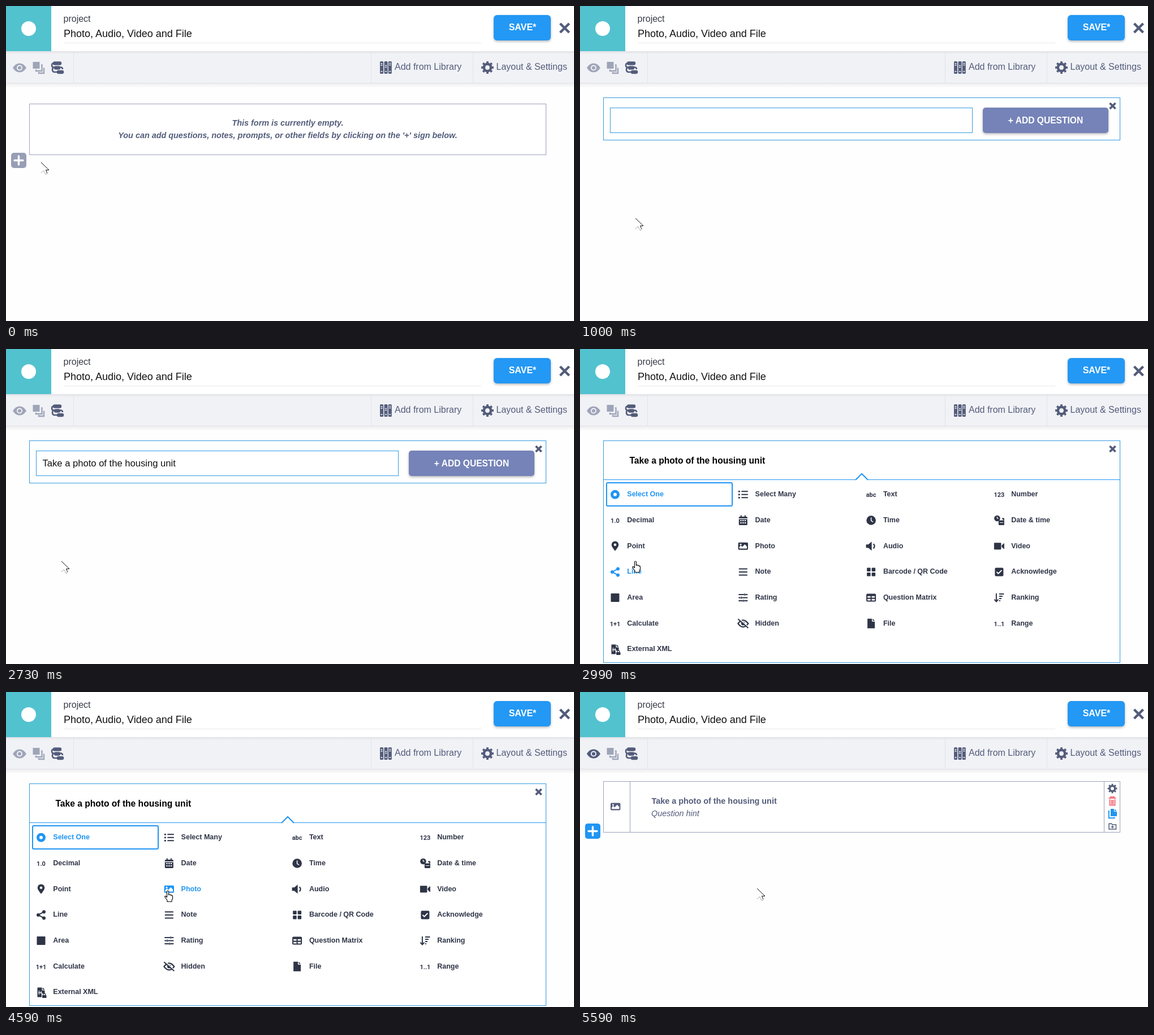
Recreate the animation shown at these times as an HTML page. Size 1004 by 558 pixels, loop 6.47 s.

```html
<!DOCTYPE html>
<html lang="en">
<head>
<meta charset="utf-8">
<title>Form builder</title>
<style>
  html, body { margin: 0; width: 100%; height: 100%; overflow: hidden; background: #fefefe; }
  svg { display: block; width: 100%; height: 100%; }
  text { font-family: "Liberation Sans", Arial, sans-serif; fill: currentColor; white-space: pre; }
  .b { font-weight: 700; }
  .i { font-style: italic; }
  .mid { text-anchor: middle; }
  .s16 { font-size: 16px; }
  .s14 { font-size: 14.4px; }
  .num { font: 700 11px Roboto, sans-serif; text-anchor: middle; }
  .label { font-size: 12.5px; font-weight: 700; }
  .ln { fill: none; stroke: currentColor; }
  .lift { filter: drop-shadow(0 2px 2px rgba(0,0,0,.28)); }
  .slate { color: #535c7a; }
  .blue { color: #2095f3; }
</style>
</head>
<body>
<svg viewBox="0 0 1004 558" fill="currentColor">
  <defs>
    <linearGradient id="fade" x2="0" y2="1">
      <stop stop-color="#000" stop-opacity=".07"/><stop offset="1" stop-color="#000" stop-opacity="0"/>
    </linearGradient>
    <g id="gear" class="ln">
      <circle r="6.2" stroke-width="4.6"/>
      <circle r="9" stroke-width="4" pathLength="16" stroke-dasharray="1" transform="rotate(-11.25)"/>
    </g>
    <g id="eye">
      <path d="M-12 0Q-7-8 0-8T12 0Q7 8 0 8T-12 0Z"/>
      <circle r="5" fill="#f1f2f6"/><circle r="3.1"/>
    </g>
    <g id="picture">
      <rect x="-8.7" y="-6.5" width="17.4" height="13" rx="2"/>
      <path fill="#fff" d="M-6.7 4.3V1.6L-4-1.2-1.5 1.3 3-3.3 6.7.5V4.3Z"/>
      <circle cx="-4.3" cy="-3" r="1.5" fill="#fff"/>
    </g>
    <g id="plus">
      <rect width="27" height="27" rx="5"/>
      <path d="M13.5 6V21M6 13.5H21" stroke="#fff" stroke-width="3.4" stroke-linecap="round"/>
    </g>
    <path id="cross" class="ln" d="M-1-1 1 1M1-1-1 1"/>
  </defs>

  <rect width="1004" height="558" fill="#fefefe"/>
  <rect y="136" width="1004" height="9" fill="url(#fade)"/>
  <rect y="80" width="1004" height="56" fill="#f1f2f6"/>
  <rect y="80" width="1004" height="5" fill="url(#fade)"/>
  <path d="M119.5 81V136M645.5 81V136M825.5 81V136M0 136.5H1004" stroke="#e1e3e9"/>
  <rect width="1004" height="80" fill="#fff"/>
  <rect width="80" height="80" fill="#52c2cf"/>
  <circle cx="40" cy="40" r="13" fill="#fff"/>
  <text x="101.5" y="28" class="s16" color="#383c48">project</text>
  <text x="102" y="55" font-size="18" color="#111">Photo, Audio, Video and File</text>
  <path d="M102 65.5H840" stroke="#e8e9ed"/>
  <g class="lift"><rect x="862" y="16" width="101" height="45" rx="6" fill="#2398f5"/></g>
  <text x="913" y="43" class="b s16 mid" color="#fff">SAVE*</text>

  <g class="slate">
    <use href="#cross" transform="translate(987.5 39) scale(8)" stroke-width=".55"/>
    <g color="#9fa5b8">
      <use href="#eye" x="24" y="109.500"/>
      <rect x="47.500" y="99" width="12" height="12"/>
      <path class="ln" stroke-width="2.4" d="M62 104.500H63.500V115H53V112.500M67 109.500V119H58V117"/>
    </g>
    <use id="eyeOn" href="#eye" x="24" y="109.500"/>
    <path class="ln" stroke-width="2.600" d="M89 101.500H84Q81 101.500 81 105T84 108.500H97Q100 109 100 112"/>
    <path class="ln" stroke-width="6.500" stroke-linecap="round" d="M86 101.500H95M88 109.500H93M93 117H99"/>
    <path class="ln" stroke-width="2.600" d="M84 109Q82 110 82 113T85 117H92"/>
    <g id="books">
      <rect x="661" y="98" width="6" height="22" rx="1.500"/><rect x="668.500" y="98" width="6" height="22" rx="1.500"/>
      <rect x="675.800" y="98" width="6" height="22" rx="1.500"/>
      <path stroke="#f1f2f6" stroke-width="1.500" d="M662.500 102H665.500M662.500 105H665.500M670 105.500H673M670 108.500H673M677.300 101.500H680.300M677.300 104.500H680.300M662.500 116H665.500M670 116H673M677.300 116H680.300"/>
    </g>
    <text x="687" y="113" class="s16">Add from Library</text>
    <use href="#gear" x="851" y="109"/>
    <text x="866.500" y="113" class="s16">Layout &amp; Settings</text>
  </g>

  <g id="empty" class="slate">
    <rect x="41.500" y="173.500" width="913" height="90" fill="#fff" stroke="#9da2bb"/>
    <text x="498" y="212" class="b i s14 mid">This form is currently empty.</text>
    <text x="498" y="234" class="b i s14 mid">You can add questions, notes, prompts, or other fields by clicking on the '+' sign below.</text>
    <use id="add" href="#plus" x="9" y="260"/>
  </g>

  <g id="ask">
    <rect x="41.500" y="162.500" width="913" height="75" fill="#fff" stroke="#359bdf"/>
    <rect x="53.500" y="180.500" width="640" height="44" fill="#fff" stroke="#359bdf"/>
    <text id="typed" x="64.500" y="208" font-size="16.600" color="#111"></text>
    <rect id="caret" y="192" width="1.600" height="21" fill="#000"/>
    <g class="lift"><rect x="712" y="180" width="222" height="45" rx="5" fill="#7583b8"/></g>
    <text x="823" y="208" class="b mid" font-size="15.600" color="#fff">+ ADD QUESTION</text>
  </g>

  <g id="menu">
    <rect x="41.500" y="162.500" width="913" height="393" fill="#fff" stroke="#359bdf"/>
    <text x="87.500" y="203" class="b" font-size="15.600" color="#000">Take a photo of the housing unit</text>
    <path class="ln blue" d="M42 231.500H487M509 231.500H954"/>
    <path class="ln blue" stroke-width="2" d="M487 232 498 221 509 232"/>
    <rect class="ln blue" x="47" y="237" width="222" height="41" rx="2" stroke-width="2"/>
    <g id="items"></g>
  </g>
  <use id="close" class="slate" href="#cross" transform="translate(941.500 177) scale(5)" stroke-width=".75"/>

  <g id="row" class="slate">
    <rect x="41.500" y="158.500" width="913" height="90" fill="#fff" stroke="#9da2bb"/>
    <path stroke="#9da2bb" d="M88.500 159V248M926.500 159V248"/>
    <use href="#picture" x="62.700" y="203"/>
    <text x="126.500" y="198" class="b s14">Take a photo of the housing unit</text>
    <text x="126" y="220" class="i s14">Question hint</text>
    <use href="#gear" transform="translate(941 171) scale(.76)"/>
    <g class="ln" color="#f4717c" stroke-width="2">
      <path d="M934.500 188H947.500M938 187V185.800H944V187M936.500 190V200.500H945.500V190M939.700 191V199M942.300 191V199"/>
    </g>
    <g class="blue">
      <path d="M938 207H944.500L949 211.500V220H938Z"/>
      <path class="ln" stroke-width="2" d="M936 211H934.800V223.200H944.500V221.500"/>
      <path stroke="#fff" d="M944.500 207V211.500H949"/>
    </g>
    <path class="ln" stroke-width="1.500" d="M935 233.300H939.500L941 235H947.500V243H935ZM941.300 236.500V241.500M938.800 239H943.800"/>
    <use href="#plus" x="9" y="233" color="#979eb5"/>
    <use id="addOn" class="blue" href="#plus" x="9" y="233"/>
  </g>

  <g id="arrow">
    <path fill="#fff" d="M0 0V18L5 14 8 21 11 20 9 14H14Z"/>
    <path fill="none" stroke="#111" d="M0 0 14 13.500H8.500L11 19.500"/>
    <path fill="none" stroke="#777" stroke-dasharray="2 1.500" d="M0 18.500 4.500 14.500 8 21.500 11 20"/>
  </g>
  <path id="hand" fill="#fff" stroke="#111" stroke-width="1.200" stroke-linejoin="round"
    d="M-1.500 11.500V1.500Q-1.500 0 0 0T1.500 1.500V7.500Q2 6.300 3 6.500T4.300 8Q4.700 7 5.600 7.300T6.700 8.900Q7.100 8.100 7.800 8.500T8.500 10V14L7 17V19.500H-1V17L-5 11.500Q-5.600 10-4.500 9.700T-2.500 10.700Z"/>
</svg>

<script>
const LOOP = 6470;
const PROMPT = "Take a photo of the housing unit";
const OPEN = 470, MENU = 2990, DONE = 5390;
const INK = "#2f3547", BLUE = "#2095f3", GREY = "#979eb5";
const $ = id => document.getElementById(id);

const word = s => `<text class="num" y="4.500">${s}</text>`;
const path = d => `<path d="${d}"/>`;
const line = (d, w = 2) => `<path class="ln" stroke-width="${w}" d="${d}"/>`;
const cut = (d, w = 1.5) => `<path fill="none" stroke="#fff" stroke-width="${w}" d="${d}"/>`;
const box = (x, y, w, h = w, r = 1) => `<rect x="${x}" y="${y}" width="${w}" height="${h}" rx="${r}"/>`;
const dot = (x, y, r) => `<circle cx="${x}" cy="${y}" r="${r}"/>`;
const sheet = path("M-6.500-8.500H1.500V-3.500H6.500V8.500H-6.500Z") + path("M2.700-8.500 6.500-4.700H2.700Z");

// Menu entries, row by row
const ENTRIES = [
  ["Select One", `<circle class="ln" r="5.500" stroke-width="5"/>`],
  ["Select Many", [-5.5, 0, 5.5].map(y => dot(-7, y, 1.6)).join("") + line("M-3-5.500H8.500M-3 0H8.500M-3 5.500H8.500")],
  ["Text", word("abc")],
  ["Number", word("123")],
  ["Decimal", word("1.0")],
  ["Date", box(-7.5, -6.5, 15, 15, 1.5) + line("M-3.500-9V-5M3.500-9V-5") + cut("M-7.500-2.800H7.500") + cut("M-5 .500H5M-5 4.500H5", 2.2).replace("/>", ' stroke-dasharray="2.400 1.400"/>')],
  ["Time", dot(0, 0, 8.3) + cut("M0-5V.500L3.500 3")],
  ["Date & time", box(-1, 0, 10, 8.5) + line("M5-3H8V0") + dot(-3.500, -3.5, 5.3) + cut("M-3.500-6.500V-3.500H-1M1 4H7.500", 1.2)],
  ["Point", path("M0 8.500Q-6.300 1-6.300-2.500A6.300 6.300 0 0 1 6.300-2.500Q6.300 1 0 8.500Z") + `<circle cy="-2.500" r="2.300" fill="#fff"/>`],
  ["Photo", `<use href="#picture"/>`],
  ["Audio", path("M-9-3H-5L1-8V8L-5 3H-9Z") + line("M4-4Q8 0 4 4", 2.2)],
  ["Video", box(-9, -6, 12.5, 12) + path("M4.500-1.500 9-5.500V5.500L4.500 1.500Z")],
  ["Line", dot(-5, 0, 3) + dot(5, -5.5, 3) + dot(5, 5.5, 3) + line("M5-5.500-5 0 5 5.500")],
  ["Note", line("M-7.500-5.500H7.500M-7.500 0H7.500M-7.500 5.500H7.500")],
  ["Barcode / QR Code", box(-7.5, -7.5, 6.5) + box(1, -7.5, 6.5) + box(-7.5, 1, 6.5) + box(1, 1, 6.5)],
  ["Acknowledge", box(-7.5, -7.5, 15, 15, 2) + cut("M-4.500 0-1.500 3 4.500-3", 2)],
  ["Area", box(-7.5, -7.5, 15)],
  ["Rating", line("M-8-5.500H2M4-5.500H8M-8 0H-4M-2 0H8M-8 5.500H0M2 5.500H8") + line("M3-7.500V-3.500M-3-2V2M1 3.500V7.500", 1.4)],
  ["Question Matrix", box(-8.5, -7, 17, 14, 2) + cut("M-6.500-1.500H-1M1-1.500H6.500M-6.500 3.500H-1M1 3.500H6.500", 2.8)],
  ["Ranking", line("M-5-7.500V6M-8.500 3-5 7-1.500 3M0-6.500H8.500M0-2.500H6M0 1.500H4M0 5.500H2")],
  ["Calculate", word("1+1")],
  ["Hidden", line("M-9 0Q0-12 9 0 0 12-9 0Z", 2.2) + dot(0, 0, 3.3) + cut("M-7-8.500 9 6.500", 2) + line("M-9-8 9 8", 2)],
  ["File", sheet + cut("M2-8.500V-4H6.500", .9)],
  ["Range", word("1..1")],
  ["External XML", sheet + cut("M-3.500-3V4M0-2V3M-5 .500H2", 1.2) + `<rect x="1" y="2" width="9" height="8" fill="#fff"/>` + box(2, 5, 7.5, 5) + line("M3.800 5V3Q5.700 1 7.600 3V5", 1.3)]
];

const items = ENTRIES.map(([name, icon], n) => {
  const x = 62 + n % 4 * 226.3, y = 257.2 + Math.floor(n / 4) * 45.7;
  $("items").insertAdjacentHTML("beforeend",
    `<g><g transform="translate(${x} ${y + .6})">${icon}</g><text class="label" x="${x + 21.3}" y="${y + 4}"></text></g>`);
  const g = $("items").lastElementChild;
  g.lastElementChild.textContent = name;
  return g;
});

// Pointer moves: start, end, number of steps, target
const START = [62, 277];
const MOVES = [
  [70, 270, 4, [24, 276]],
  [470, 670, 4, [98, 376]],
  [4180, 4660, 8, [313, 348]]
];
const ease = p => p < .5 ? 2 * p * p : 1 - 2 * (1 - p) ** 2;

function pointer(t) {
  let at = START;
  for (const [t0, t1, n, to] of MOVES) {
    if (t < t0) break;
    const step = Math.min(n, 1 + Math.floor((t - t0) / (t1 - t0) * (n - 1) + .001));
    const p = ease(step / n), from = at;
    at = from.map((v, i) => v + (to[i] - v) * p);
  }
  return at;
}

function typedCount(t) {
  if (t < 1340) return 0;
  if (t < 2010) return Math.min(17, 1 + Math.floor((t - 1340) / 39.3));
  if (t < 2110) return 18;
  return Math.min(PROMPT.length, 19 + Math.floor((t - 2110) / 41.5));
}

const show = (id, on) => $(id).style.display = on ? "" : "none";

function render(t) {
  const [x, y] = pointer(t);
  const empty = t < OPEN, ask = !empty && t < MENU, menu = t >= MENU && t < DONE, done = t >= DONE;
  show("empty", empty);
  show("ask", ask);
  show("menu", menu);
  show("close", ask || menu);
  show("row", done);

  const onAdd = empty && x < 36;
  $("add").style.color = onAdd ? BLUE : GREY;

  if (ask) {
    $("typed").textContent = PROMPT.slice(0, typedCount(t));
    $("caret").setAttribute("x", 64.3 + $("typed").getComputedTextLength());
    show("caret", t < 1000 || t >= 1340 && t < 2730);
  }

  const over = Math.floor((y - 234.5) / 45.7) * 4 + Math.floor((x - 45) / 226.3);
  items.forEach((g, n) => g.style.color = n === 0 || n === over ? BLUE : INK);

  const lit = done ? Math.min(1, (1 + Math.floor((t - DONE) / 66)) / 4) : 0;
  $("eyeOn").style.opacity = $("addOn").style.opacity = lit;

  const hand = onAdd || menu;
  show("hand", hand);
  show("arrow", !hand);
  const spot = `translate(${Math.round(x)} ${Math.round(y)})`;
  $("hand").setAttribute("transform", spot);
  $("arrow").setAttribute("transform", spot);
}

const begun = performance.now();
function tick() {
  render((performance.now() - begun) % LOOP);
  requestAnimationFrame(tick);
}
tick();
</script>
</body>
</html>
```
